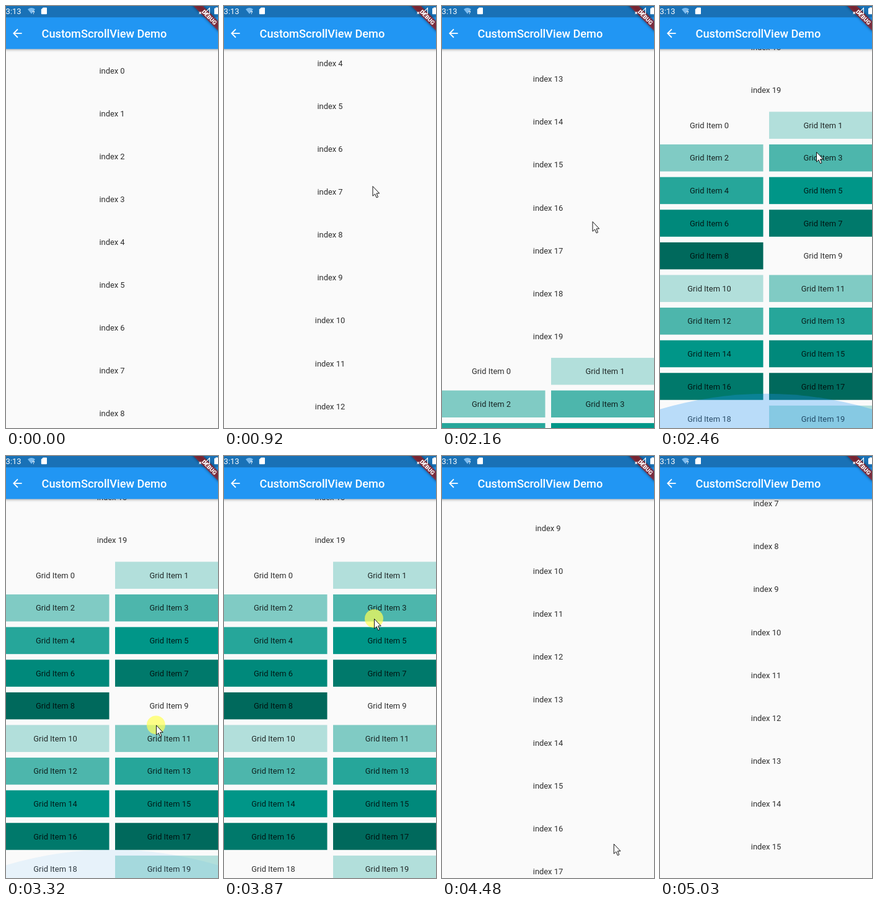
An HTML page that plays this animation: 342x680 px, repeating every 5660 ms.

```html
<!DOCTYPE html>
<html lang="en">
<head>
<meta charset="utf-8">
<title>CustomScrollView Demo</title>
<style>
  html, body { margin: 0; width: 100%; height: 100%; overflow: hidden; background: #fafafa; }
  svg { display: block; font-family: Roboto, sans-serif; }
  #list { font-size: 12.9px; text-anchor: middle; fill: rgba(0, 0, 0, .82); }
  #bar { filter: drop-shadow(0 1.5px 2px rgba(0, 0, 0, .35)); }
  #shade { filter: blur(2px); }
</style>
</head>
<body>
<svg width="342" height="680" viewBox="0 0 342 680">
  <rect width="342" height="680" fill="#fafafa"/>
  <g id="list"></g>
  <path id="glow" fill="#2196f3"/>

  <rect id="bar" x="-9" y="-9" width="360" height="78.3" fill="#2196f3"/>
  <rect width="342" height="18.3" fill="#1971b6"/>
  <path transform="translate(7.4 33.2) scale(.91)" fill="#fff"
    d="M20 11H7.83l5.59-5.59L12 4l-8 8 8 8 1.41-1.41L7.83 13H20z"/>
  <text x="57.6" y="51" font-size="18.2" font-weight="500" fill="#fff">CustomScrollView Demo</text>

  <g transform="translate(350 -3.8) rotate(45)">
    <rect id="shade" x="-46" y="25.5" width="92" height="10.9" fill-opacity=".55"/>
    <rect x="-46" y="25.5" width="92" height="10.9" fill="#b71c1c" fill-opacity=".627"/>
    <text y="34.3" font-size="9.3" font-weight="900" fill="#fff" text-anchor="middle">DEBUG</text>
  </g>

  <g fill="#fff">
    <text x="-.4" y="13" font-size="13">3:13</text>
    <path d="M35 5.2Q41 .8 47 5.2L41 12.8z" fill="#7cbcf0"/>
    <text x="42.5" y="13" font-size="8" font-weight="700">?</text>
    <path d="M59.8 2.5H65q1 0 1 1V12.3q0 1-1 1H57.8q-1 0-1-1V5.5z"/>
    <path d="M311.5 9.5l3.4 3.4m0-3.4l-3.4 3.4M328.4 3.4V12.4H319.4z" fill="none" stroke="#fff" stroke-width="1.2"/>
    <path d="M336 4.2q0-.8.8-.8h1.4V2.2h3.6V3.4H342V13.2H336.8q-.8 0-.8-.8z"/>
  </g>

  <g id="mouse">
    <circle id="press" r="15" fill="#ff5" fill-opacity=".7"/>
    <path d="M.5.5V16.2L4.1 12.9 6.6 18.8 9 17.8 6.6 11.9H11.2z" fill="#fff" stroke="#111"/>
  </g>
</svg>
<script>
const $ = id => document.getElementById(id);
const LOOP = 5660, START = 210, STEP = 77.74, LAST = 62;
const ROW = 69.1, TOP = 104, GRID_ROW = 52.6, GRID_TOP = TOP - ROW / 2 + 20 * ROW;
const TEAL = [, '#b2dfdb', '#80cbc4', '#4db6ac', '#26a69a', '#009688', '#00897b', '#00796b', '#00695c'];

// Moves: first step, last step, ease-out power, destination
const SCROLL = [[5.5, 16, 1.42, 658], [23, 28.5, 1, 1281], [47, 62, 2.7, 511]];
const MOUSE = [
  [0, 5, 1, 243, 540], [5.5, 9, 1, 239.5, 290],    // enter, first drag
  [14, 22, 1, 240, 596], [22, 25, 1, 242.5, 347],  // return, second drag
  [25, 29, 2, 252, 235],
  [32, 37, 1, 242, 645], [37, 43, 1.16, 242, 262], // return, pull past the end
  [47, 50, 1, 270.5, 528], [50, 61, 1.5, 281, 690] // drag back, leave
];
const PRESSES = [4, 22, 38, 47];

const progress = (k, from, to) => Math.min(1, Math.max(0, (k - from) / (to - from)));

function follow(moves, k, start) {
  return moves.reduce((pos, [from, to, power, ...goal]) => {
    const p = 1 - (1 - progress(k, from, to)) ** power;
    return pos.map((v, i) => v + (goal[i] - v) * p);
  }, start);
}

const label = (x, y, text) => `<text x="${x}" y="${y + 4.5}">${text}</text>`;
let items = '';
for (let i = 0; i < 20; i++) {
  items += label(171, TOP + i * ROW, 'index ' + i);
  const x = i % 2 ? 176 : -7.5, y = GRID_TOP + (i >> 1) * GRID_ROW;
  if (i % 9) items += `<rect x="${x}" y="${y}" width="174" height="43.5" fill="${TEAL[i % 9]}"/>`;
  items += label(x + 87, y + 21.8, 'Grid Item ' + i);
}
$('list').innerHTML = items;

function drawGlow(k) {
  const impact = k < 28.5 ? 0 : 1 - progress(k, 28.5, 37);
  const pull = Math.sin(Math.PI * progress(k, 38, 47));
  const tip = 680 - 57 * Math.sqrt(Math.max(impact, pull)), edge = tip + 25;
  $('glow').setAttribute('d', `M0 ${edge}Q171 ${2 * tip - edge} 342 ${edge}V720H0z`);
  $('glow').setAttribute('fill-opacity', .32 * impact + .14 * pull);
}

function draw(now) {
  const t = now % LOOP;
  const k = t < START ? -1 : Math.min(LAST, Math.floor((t - START) / STEP + .15));
  const [scroll] = follow(SCROLL, k, [0]), [x, y] = follow(MOUSE, k, [276, 668]);

  $('list').setAttribute('transform', `translate(0 ${-scroll})`);
  $('mouse').setAttribute('transform', `translate(${x} ${y})`);
  $('mouse').style.display = k < 0 || k > 60 ? 'none' : '';
  $('press').style.display = PRESSES.some(p => k >= p && k < p + 3) ? '' : 'none';
  drawGlow(k);
}

let begin;
function tick(now) {
  begin ??= now;
  draw(now - begin);
  requestAnimationFrame(tick);
}
draw(0);
requestAnimationFrame(tick);
</script>
</body>
</html>
```
